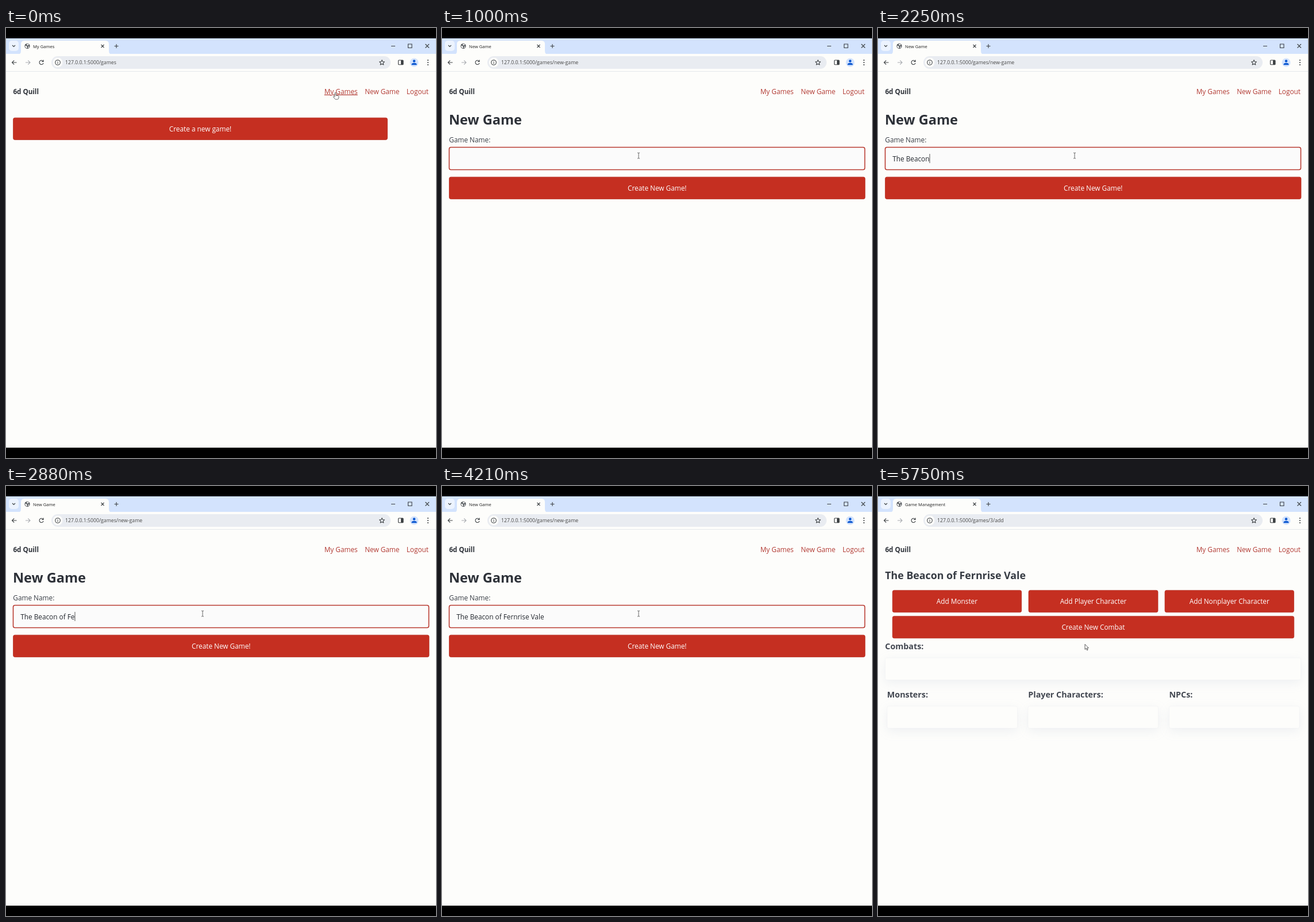
Recreate the animation shown at these times as an HTML page. Size 748 by 748 pixels, loop 5.79 s.

```html
<!DOCTYPE html>
<html lang="en">
<head>
<meta charset="utf-8">
<title>Game pages</title>
<style>
html, body { margin: 0; width: 100%; height: 100%; overflow: hidden; background: #000; }
svg { display: block; width: 748px; height: 748px; }
text { font: 11.8px "Open Sans", "Noto Sans", sans-serif; fill: #373c44; white-space: pre; }
.bold { font-weight: 700; fill: #2d3138; font-size: 11.6px; }
.h1 { font-weight: 700; font-size: 23.5px; fill: #2d3138; }
.h2 { font-weight: 700; font-size: 17.8px; fill: #373c44; }
.h3 { font-weight: 700; font-size: 14.3px; fill: #424751; }
.link { fill: #b23a33; }
.label { fill: #fff; text-anchor: middle; }
.tab { font-size: 7.6px; fill: #1f1f1f; }
.url { font-size: 8.7px; fill: #474747; }
.icon { fill: none; stroke: #3c4043; stroke-width: 1.1; }
.button { fill: #c52f21; stroke: #b52c20; stroke-width: .7; }
.card { fill: #fdfdfb; filter: drop-shadow(0 5px 9px rgba(129, 145, 181, .12)); }
.card + .edge { fill: none; stroke: #8191b5; stroke-opacity: .05; }
#entry { fill: #24282f; }
</style>
</head>
<body>
<svg viewBox="0 0 748 748">
  <rect width="748" height="748"/>
  <rect y="18" width="748" height="28" fill="#d3e3fd"/>
  <rect y="45" width="748" height="685" fill="#fdfdfb"/>
  <rect y="75" width="748" height="1" fill="#e4e7ec"/>

  <!-- tab strip -->
  <rect x="5" y="22" width="17" height="18" rx="5" fill="#ecf3fe"/>
  <path class="icon" d="M11 30l2.5 2.5 2.5-2.5"/>
  <path fill="#fdfdfb" d="M20 46q6 0 6-6V28q0-6 6-6H173q6 0 6 6V40q0 6 6 6z"/>
  <circle cx="37" cy="31.5" r="4.6" fill="#53575c"/>
  <path fill="#fdfdfb" d="M33.2 31q2-.6 3.2 1.2t-.6 3q-2.4-1-2.6-4.2zM36 28q2-1 3.8.8l-1 1.7-2.6-.5zM38 32.5l2.5-.4q-.2 2-1.8 2.8z"/>
  <text id="tab" class="tab" x="47" y="34.7"></text>
  <path class="icon" d="M165.500 29l5 5m0-5l-5 5M188.500 31.500h7m-3.500-3.500v7"/>
  <path class="icon" d="M670 31.500h7M699.500 28h6.500v6.500h-6.500zM729.500 28l6.500 6.500m0-6.500l-6.500 6.500"/>

  <!-- toolbar -->
  <rect x="79" y="49" width="590" height="22" rx="11" fill="#e9ecf1"/>
  <path class="icon" d="M18.500 60h-8m3.700-3.700l-3.700 3.700 3.700 3.700"/>
  <path class="icon" style="stroke:#a9acb0" d="M34 60h8m-3.700-3.700l3.700 3.700-3.700 3.700"/>
  <path class="icon" d="M64.500 57.700a3.600 3.600 0 1 0 .6 3.300M65 55.500v3h-3"/>
  <circle cx="90" cy="60" r="8.500" fill="#fdfdfb"/>
  <circle class="icon" cx="90" cy="60" r="4.300"/>
  <path class="icon" d="M90 59.500v2.800M90 57.400v1.100"/>
  <text id="url" class="url" x="103" y="63.100"></text>
  <path class="icon" stroke-linejoin="round" d="M654 55.600l1.300 2.900 3.100.3-2.300 2.100.7 3.100-2.800-1.600-2.800 1.600.7-3.100-2.300-2.100 3.100-.3z"/>
  <rect class="icon" x="682.500" y="56" width="8.500" height="7.800" rx="1"/>
  <rect x="687" y="56" width="4" height="7.800" fill="#3c4043"/>
  <circle cx="710" cy="60" r="7.500" fill="#d3e3fd"/>
  <g fill="#0b57d0"><circle cx="710" cy="57.500" r="2.200"/><path d="M705.500 64.300v-1.200q0-2.200 4.500-2.400 4.500.2 4.500 2.400v1.200z"/></g>
  <g fill="#3c4043"><circle cx="734" cy="56" r="1.100"/><circle cx="734" cy="60" r="1.100"/><circle cx="734" cy="64" r="1.100"/></g>

  <!-- site header -->
  <text class="bold" x="12.500" y="114.800">6d Quill</text>
  <text id="mine" class="link" x="553.700" y="114.800">My Games</text>
  <text id="new" class="link" x="624.200" y="114.800">New Game</text>
  <text class="link" x="696.700" y="114.800">Logout</text>

  <g id="page0"></g>
  <g id="page1">
    <text class="h1" x="12" y="167.500">New Game</text>
    <text x="12.300" y="198.500">Game Name:</text>
    <rect id="field" x="12.500" y="207.500" width="723" height="39" rx="3" fill="#fbfbfb"/>
    <text id="entry" x="25.200" y="232"></text>
    <rect id="caret" y="219" width="1" height="16" fill="#555"/>
  </g>
  <g id="page2">
    <text class="h2" x="12.300" y="162.200"></text>
    <text class="h3" x="12.300" y="284">Combats:</text>
    <text class="h3" x="15.800" y="368">Monsters:</text>
    <text class="h3" x="261.300" y="368">Player Characters:</text>
    <text class="h3" x="506.500" y="368">NPCs:</text>
  </g>

  <g id="cursor">
    <path id="arrow" fill="#fff" stroke="#333" stroke-width=".8" d="M0 0v9l2.100-1.900 1.500 3.300 1.500-.7-1.500-3.200h2.800z"/>
    <path id="hand" fill="#fff" stroke="#444" stroke-width=".8" d="M-1 1q0-1.200 1-1.200t1 1.200v3.600l3.800.8q1.300.3 1.200 1.700l-.4 2.500q-.4 2-2.200 2h-2.800q-1 0-1.700-1l-2.800-3.700q1-1.300 2.900.2z"/>
    <path id="beam" fill="none" stroke="#555" stroke-width=".9" d="M-2-5q2 0 2 1 0-1 2-1M0-4v8M-2 5q2 0 2-1 0 1 2 1"/>
  </g>
</svg>
<script>
const LOOP = 5790, NAME = "The Beacon of Fernrise Vale";
const OPEN = 380, FOCUS = 680, TYPE = 1250, CARET_OFF = 4130, CLICK = 4880, CREATED = 5130;
const pages = [
  ["My Games", "games"],
  ["New Game", "games/new-game"],
  ["Game Management", "games/3/add"]
];
const $ = id => document.getElementById(id);
const show = (id, on) => $(id).style.display = on ? "" : "none";
const clamp = v => Math.max(0, Math.min(1, v));
const ease = v => (v = clamp(v), v * v * (3 - 2 * v));

function add(parent, tag, attrs, text = "") {
  const el = document.createElementNS("http://www.w3.org/2000/svg", tag);
  for (const key in attrs) el.setAttribute(key, attrs[key]);
  el.textContent = text;
  return $(parent).appendChild(el);
}
function button(page, x, y, width, label) {
  const box = add(page, "rect", { class: "button", x, y, width, height: 38.3, rx: 3 });
  add(page, "text", { class: "label", x: x + width / 2, y: y + 24 }, label);
  return box;
}
function card(x, y, width) {
  for (const name of ["card", "edge"])
    add("page2", "rect", { class: name, x, y, width, height: 38.5, rx: 3 });
}

button("page0", 12.5, 156.2, 651, "Create a new game!");
const submit = button("page1", 12.5, 259.2, 723.5, "Create New Game!");
button("page2", 25.2, 181.4, 224.5, "Add Monster");
button("page2", 262, 181.4, 225, "Add Player Character");
button("page2", 499, 181.4, 224.5, "Add Nonplayer Character");
button("page2", 25.2, 226.4, 698.5, "Create New Combat");
card(12.5, 299, 723);
for (const x of [16, 261, 506.5]) card(x, 383, 226.5);
document.querySelector(".h2").textContent = NAME;

// Pointer stops: start time, end time, x, y
const moves = [
  [40, 270, 653, 110],
  [410, 640, 342, 222],
  [4250, 4600, 362.7, 275],
  [5180, 5400, 360, 275.3]
];
function pointer(t) {
  let x = 573, y = 112.5;
  for (const [from, to, tx, ty] of moves) {
    const k = ease((t - from) / (to - from));
    x += (tx - x) * k;
    y += (ty - y) * k;
  }
  return [x, y];
}

function draw(now) {
  const t = now % LOOP;
  const page = t < OPEN ? 0 : t < CREATED ? 1 : 2;
  for (let i = 0; i < 3; i++) show("page" + i, i === page);
  $("tab").textContent = pages[page][0];
  $("url").textContent = "127.0.0.1:5000/" + pages[page][1];

  const [x, y] = pointer(t);
  const inNav = y > 101 && y < 120;
  const overMine = inNav && x > 553 && x < 612;
  const overNew = inNav && x > 624 && x < 685;
  const overField = page === 1 && y > 207 && y < 247;
  const overSubmit = page === 1 && y > 259 && y < 298;
  const hand = overMine || overNew || overSubmit;
  $("mine").style.textDecoration = overMine ? "underline" : "none";
  $("new").style.textDecoration = overNew ? "underline" : "none";

  const focused = t >= FOCUS && t < CLICK;
  $("field").setAttribute("stroke", focused ? "#b83a30" : "#cfc9d6");
  $("field").setAttribute("stroke-width", focused ? 1.6 : 1.1);
  const typed = Math.floor((t - TYPE) / 100);
  $("entry").textContent = NAME.slice(0, Math.max(0, typed));
  show("caret", focused && (t < 900 || t >= TYPE && t < CARET_OFF));
  if (page === 1)
    $("caret").setAttribute("x", 25.2 + $("entry").getComputedTextLength());

  submit.style.fill = overSubmit ? "#ab2519" : "";
  submit.style.stroke = t >= CLICK ? "#d98f88" : "";

  $("cursor").setAttribute("transform", `translate(${x} ${y})`);
  show("hand", hand);
  show("beam", overField);
  show("arrow", !hand && !overField);
  requestAnimationFrame(() => draw(performance.now()));
}
draw(performance.now());
</script>
</body>
</html>
```
